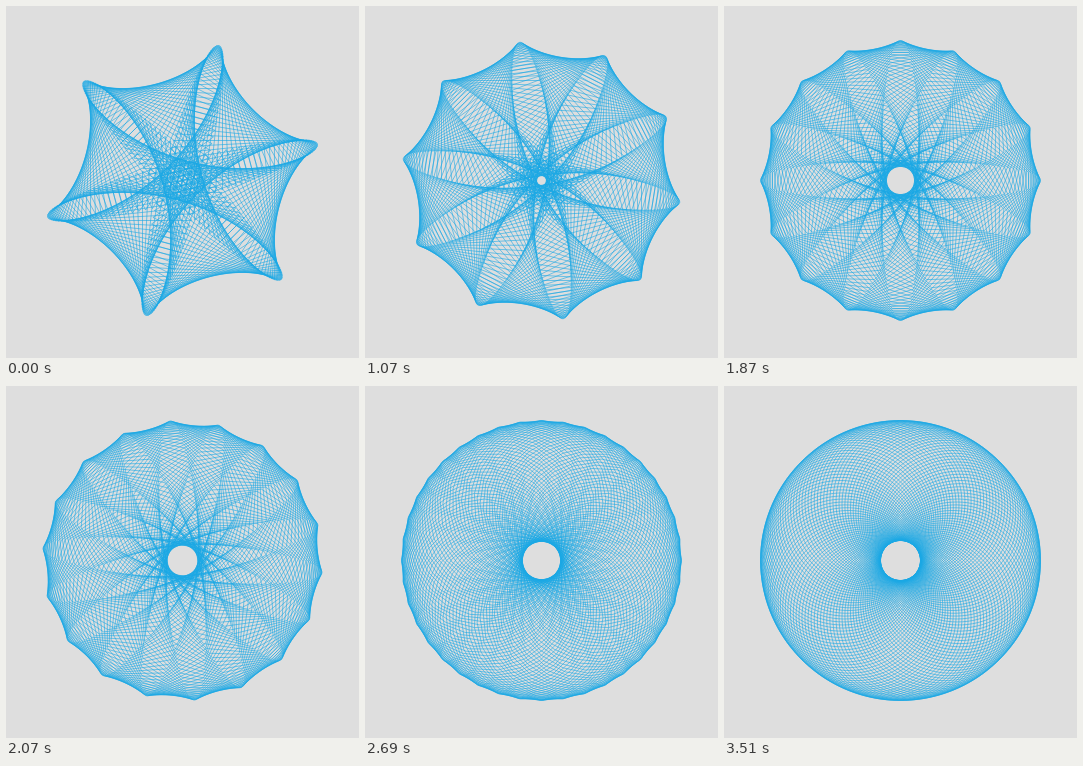
Recreate the animation shown at these times as an HTML page with a canvas. Size 353x352 px, loop 4320 ms.

```html
<!DOCTYPE html>
<html lang="en">
<head>
<meta charset="utf-8">
<title>Orbiting polygons</title>
<style>
  html, body { margin: 0; width: 100%; height: 100%; overflow: hidden; background: #dedede; }
  canvas { display: block; }
</style>
</head>
<body>
<canvas id="stage" width="353" height="352"></canvas>
<script>
const ctx = document.getElementById('stage').getContext('2d');
const TAU = Math.PI * 2;
const LOOP = 4320;
const COPIES = 120, ORBIT = 60, RADIUS = 80;

// [start time in ms, number of polygon sides]
const STEPS = [
  [0, 3], [660, 4], [1070, 5], [1270, 6], [1470, 7], [1870, 8],
  [2070, 9], [2280, 10], [2690, 20], [3100, 50], [3510, 100]
];

function polygon(cx, cy, sides, turn) {
  ctx.beginPath();
  for (let i = 0; i < sides; i++) {
    const a = turn + TAU * i / sides;
    ctx.lineTo(cx + RADIUS * Math.cos(a), cy + RADIUS * Math.sin(a));
  }
  ctx.closePath();
  ctx.stroke();
}

// Each copy moves around the centre while turning the opposite way.
function draw(sides) {
  ctx.fillStyle = '#dedede';
  ctx.fillRect(0, 0, 353, 352);
  ctx.strokeStyle = '#1ba8e4';
  ctx.lineWidth = 0.6;
  ctx.lineJoin = 'round';
  for (let i = 0; i < COPIES; i++) {
    const a = TAU * i / COPIES;
    polygon(176.5 + ORBIT * Math.cos(a), 174.5 + ORBIT * Math.sin(a), sides, TAU / 4 - a);
  }
}

let shown = 0;
const start = performance.now();

function tick() {
  const t = (performance.now() - start) % LOOP;
  const sides = STEPS.findLast(([from]) => t >= from)[1];
  if (sides !== shown) draw(shown = sides);
  requestAnimationFrame(tick);
}
tick();
</script>
</body>
</html>
```
